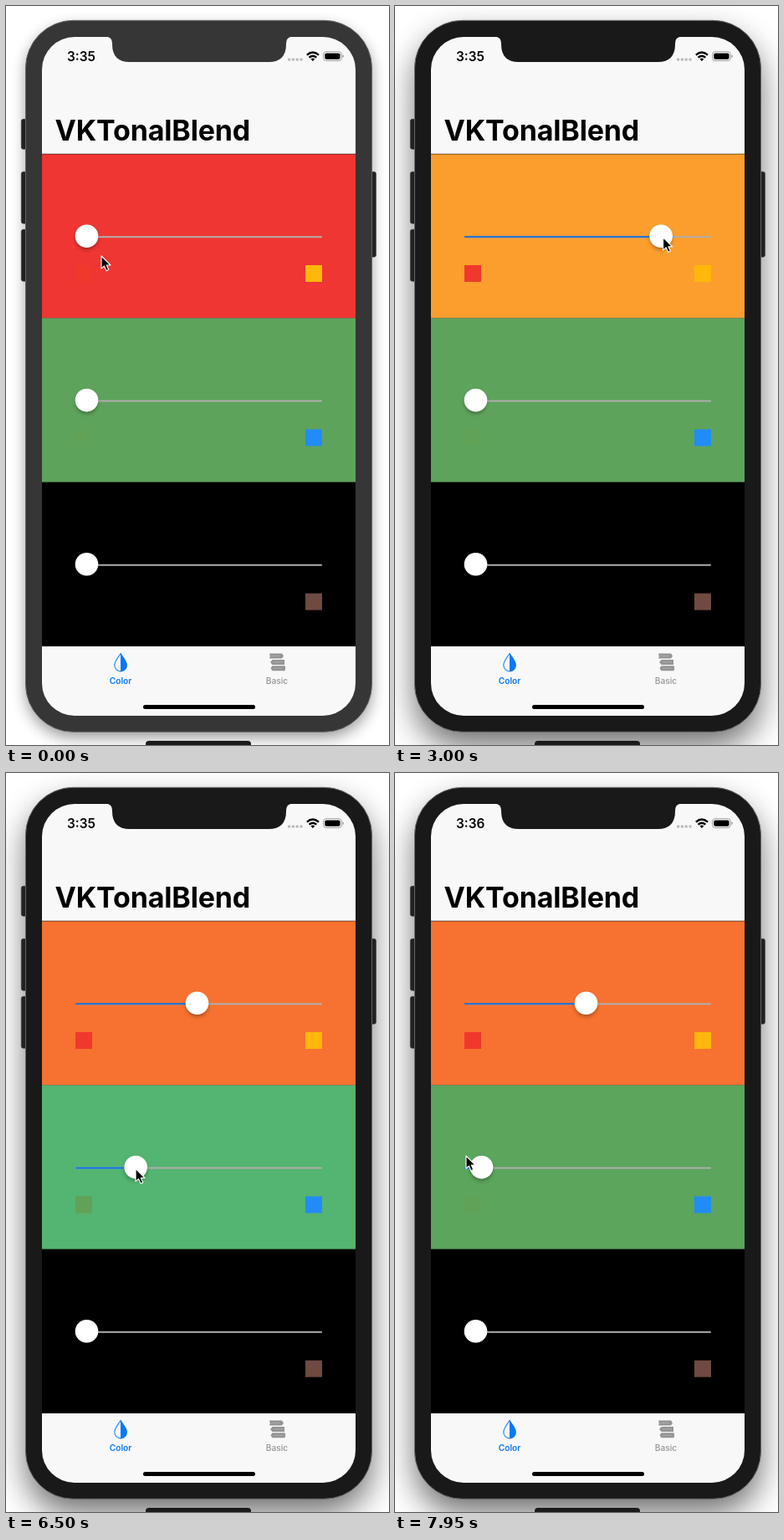
Animation, 458 px wide and 884 px high, one loop 8000 ms. Source, as an HTML page:

```html
<!DOCTYPE html>
<html lang="en">
<head>
<meta charset="utf-8">
<title>Color sliders</title>
<style>
html, body { margin: 0; width: 100%; height: 100%; overflow: hidden; background: #fff; }
svg { display: block; width: 100vw; height: 100vh; }
text { font-family: Inter, Roboto, sans-serif; }
</style>
</head>
<body>
<svg viewBox="0 0 458 884">
  <defs>
    <filter id="soft" x="-30%" y="-30%" width="160%" height="160%"><feGaussianBlur stdDeviation="9"/></filter>
    <filter id="deep" x="-30%" y="-30%" width="160%" height="160%"><feGaussianBlur stdDeviation="19"/></filter>
    <filter id="lift" x="-50%" y="-50%" width="200%" height="200%"><feGaussianBlur stdDeviation="2.6"/></filter>
    <clipPath id="screen"><rect x="43" y="37" width="375" height="812" rx="39"/></clipPath>
  </defs>
  <rect width="458" height="884" fill="#fff"/>
  <rect id="idleShadow" x="24" y="25" width="413" height="850" rx="56" opacity=".4" filter="url(#soft)"/>
  <rect id="liveShadow" x="24" y="36" width="413" height="850" rx="56" opacity=".56" filter="url(#deep)"/>
  <path d="M167 884v-1q0-4 4-4h118q4 0 4 4v1z" fill="#1b1b1b"/>
  <g fill="#222" stroke="#3a3a3a" stroke-width=".6">
    <rect x="18.3" y="135.3" width="9" height="36" rx="2.5"/>
    <rect x="18.3" y="198.3" width="9" height="62" rx="2.5"/>
    <rect x="18.3" y="267.3" width="9" height="62" rx="2.5"/>
    <rect x="433.5" y="198.3" width="9" height="102" rx="2.5"/>
  </g>
  <rect class="bezel" x="23.5" y="17.3" width="414" height="851" rx="57" stroke="#626564"/>
  <g clip-path="url(#screen)">
    <rect x="43" y="37" width="375" height="812" fill="#f8f8f8"/>
    <g id="panels"></g>
    <path d="M43 177.2h375" stroke="#000" stroke-opacity=".4" stroke-width=".8"/>
  </g>
  <path class="bezel" d="M120 36.5q7 1 7 8v1q0 21.5 21 21.5h166q21 0 21-21.5v-1q0-7 7-8z"/>
  <text id="clock" x="73" y="66" font-size="15.4" font-weight="600">3:35</text>
  <text x="58.5" y="161" font-size="34" font-weight="700" letter-spacing="-.15">VKTonalBlend</text>
  <g fill="#b9b9b9">
    <circle cx="338.6" cy="64" r="1.8"/><circle cx="343.4" cy="64" r="1.8"/>
    <circle cx="348.2" cy="64" r="1.8"/><circle cx="353" cy="64" r="1.8"/>
  </g>
  <g fill="none" stroke="#000" stroke-width="2.3">
    <path d="M359.8 58.6q7-6.2 14.2 0"/><path d="M362.5 61.6q4.4-3.8 8.8 0"/>
  </g>
  <path d="M364.5 63.4q2.4-1.8 4.8 0l-2.4 2.5z"/>
  <rect x="379.6" y="54.7" width="21.6" height="10.8" rx="3.2" fill="none" stroke="#a0a0a0"/>
  <rect x="381.3" y="56.4" width="18.2" height="7.4" rx="1.8"/>
  <path d="M402.4 58.2q1.6.5 1.6 1.9t-1.6 1.9z" fill="#a0a0a0"/>
  <g fill="#0a78f0">
    <path d="M137 774.6c-3 5-7.2 9-7.2 14a7.2 7.2 0 0 0 14.4 0c0-5-4.2-9-7.2-14z" fill="none" stroke="#2b8df2" stroke-width="1.2"/>
    <path d="M137 774c3 5 7.7 9.3 7.7 14.4a7.6 7.6 0 0 1-7.7 7.8z"/>
    <text x="137" y="811.4" font-size="10.2" font-weight="600" text-anchor="middle">Color</text>
  </g>
  <g fill="#949494">
    <path d="M315 774.5h15l2 3-2 3h-15q1.4-3 0-6zM318.5 781.9h14.5v6h-14.500l-2.500-3zM318.500 789.300h15q1.500 3 0 6h-15l-2-3z"/>
    <text x="324" y="811.4" font-size="10.2" font-weight="500" text-anchor="middle">Basic</text>
  </g>
  <path d="M317 777.500h11M320 784.900h11M320 792.300h11" stroke="#b5b5b5" stroke-width=".7"/>
  <rect x="164" y="836" width="134" height="5" rx="2.500"/>
  <path id="cursor" d="M0 0V15.200L3.500 12 6 17.700 8.700 16.500 6.300 11H11z" stroke="#fff" stroke-width="1.100" stroke-linejoin="round"/>
</svg>
<script>
const LOOP = 8000, STEP = 50, MIN = 96.5, MAX = 364.5;
const FOCUS = 1000, MINUTE = 7800;
const $ = id => document.getElementById(id);

// Panels: top, HSB ends, swatch colours, fill colour
const panels = [
  { y: 177, from: [1.3, .79, .94], to: [39, .824, 1], left: '#f0382d', right: '#ffb70b', fill: '#2874d4' },
  { y: 373.4, from: [118, .436, .64], to: [209, .875, .94], left: '#60a258', right: '#218cf7', fill: '#0a73f4' },
  { y: 569.6, from: [0, 0, 0], to: [12, .42, .43], left: '#000', right: '#6f4a41', fill: '#0a73f4' }
];

// Motion keys: [time, x] for thumbs, [time, x, y] for the pointer
const drags = [
  [[1000, MIN], [1450, 240.5], [1950, MAX], [2550, MAX], [3750, 159.5], [4100, MIN], [4350, MIN], [5350, 204.3], [5950, 228.5]],
  [[6370, MIN], [6800, MAX], [7150, MAX], [7950, 103.5]],
  [[0, MIN]]
];
const pointer = [
  [0, 114, 299], [700, 99, 280], [980, 99, 280], [1450, 250, 291], [2000, 384, 289], [2200, 386, 288],
  [2550, 379, 286], [3750, 151, 262], [4100, 84, 264], [4350, 88, 268], [5350, 204, 280], [5950, 229, 280],
  [6290, 98, 474], [6370, 98, 474], [6820, 388, 470], [6950, 392, 469], [7150, 382, 467], [7950, 85, 458]
];

// Monotone cubic through the keys
function track(keys, t, c = 1) {
  const last = keys.length - 1;
  if (t <= keys[0][0]) return keys[0][c];
  if (t >= keys[last][0]) return keys[last][c];
  const i = keys.findIndex(k => k[0] > t) - 1;
  const slope = j => (keys[j + 1][c] - keys[j][c]) / (keys[j + 1][0] - keys[j][0]);
  const tangent = j => {
    if (j === 0) return 0;
    if (j === last) return slope(j - 1) * .5;
    const a = slope(j - 1), b = slope(j);
    return a * b > 0 ? 2 * a * b / (a + b) : 0;
  };
  const a = keys[i], b = keys[i + 1], d = b[0] - a[0], u = (t - a[0]) / d, v = 1 - u;
  return v * v * (1 + 2 * u) * a[c] + u * v * v * d * tangent(i)
       + u * u * (3 - 2 * u) * b[c] - u * u * v * d * tangent(i + 1);
}

function hsb([h, s, b]) {
  const ch = n => {
    const k = (n + h / 60) % 6;
    return Math.round(255 * b * (1 - s * Math.max(0, Math.min(k, 4 - k, 1))));
  };
  return `rgb(${ch(5)},${ch(3)},${ch(1)})`;
}

$('panels').innerHTML = panels.map(({ y, left, right, fill }) => `
  <g transform="translate(0 ${y})">
    <rect class="back" x="43" width="375" height="196.400"/>
    <path d="M43 0h375" stroke="#000" stroke-opacity=".35" stroke-width=".8"/>
    <rect x="83" y="133" width="20" height="20" fill="${left}"/>
    <rect x="358" y="133" width="20" height="20" fill="${right}"/>
    <rect x="83" y="98.200" width="295" height="2" rx="1" fill="#b0aeac"/>
    <rect class="fill" x="83" y="98" width="10" height="2.200" rx="1" fill="${fill}"/>
    <g class="thumb">
      <circle cy="3" r="13" opacity=".34" filter="url(#lift)"/>
      <circle r="13.800" fill="#fff"/>
    </g>
  </g>`).join('');

panels.forEach((p, i) => {
  const g = $('panels').children[i];
  for (const name of ['back', 'fill', 'thumb']) p[name] = g.querySelector('.' + name);
});
const bezels = document.querySelectorAll('.bezel');

function draw(t) {
  const live = t >= FOCUS;
  $('idleShadow').style.display = live ? 'none' : '';
  $('liveShadow').style.display = live ? '' : 'none';
  bezels.forEach(b => b.setAttribute('fill', live ? '#191919' : '#363636'));
  $('clock').textContent = t < MINUTE ? '3:35' : '3:36';
  panels.forEach((p, i) => {
    const x = track(drags[i], t), u = (x - MIN) / (MAX - MIN);
    p.back.setAttribute('fill', hsb(p.from.map((v, j) => v + (p.to[j] - v) * u)));
    p.fill.setAttribute('width', x - 83);
    p.fill.style.display = u > 0 ? '' : 'none';
    p.thumb.setAttribute('transform', `translate(${x} 98.200)`);
  });
  $('cursor').setAttribute('transform', `translate(${track(pointer, t)} ${track(pointer, t, 2)})`);
}

const start = performance.now();
function tick() {
  const t = (performance.now() - start) % LOOP;
  draw(Math.floor(t / STEP) * STEP);
  requestAnimationFrame(tick);
}
tick();
</script>
</body>
</html>
```
